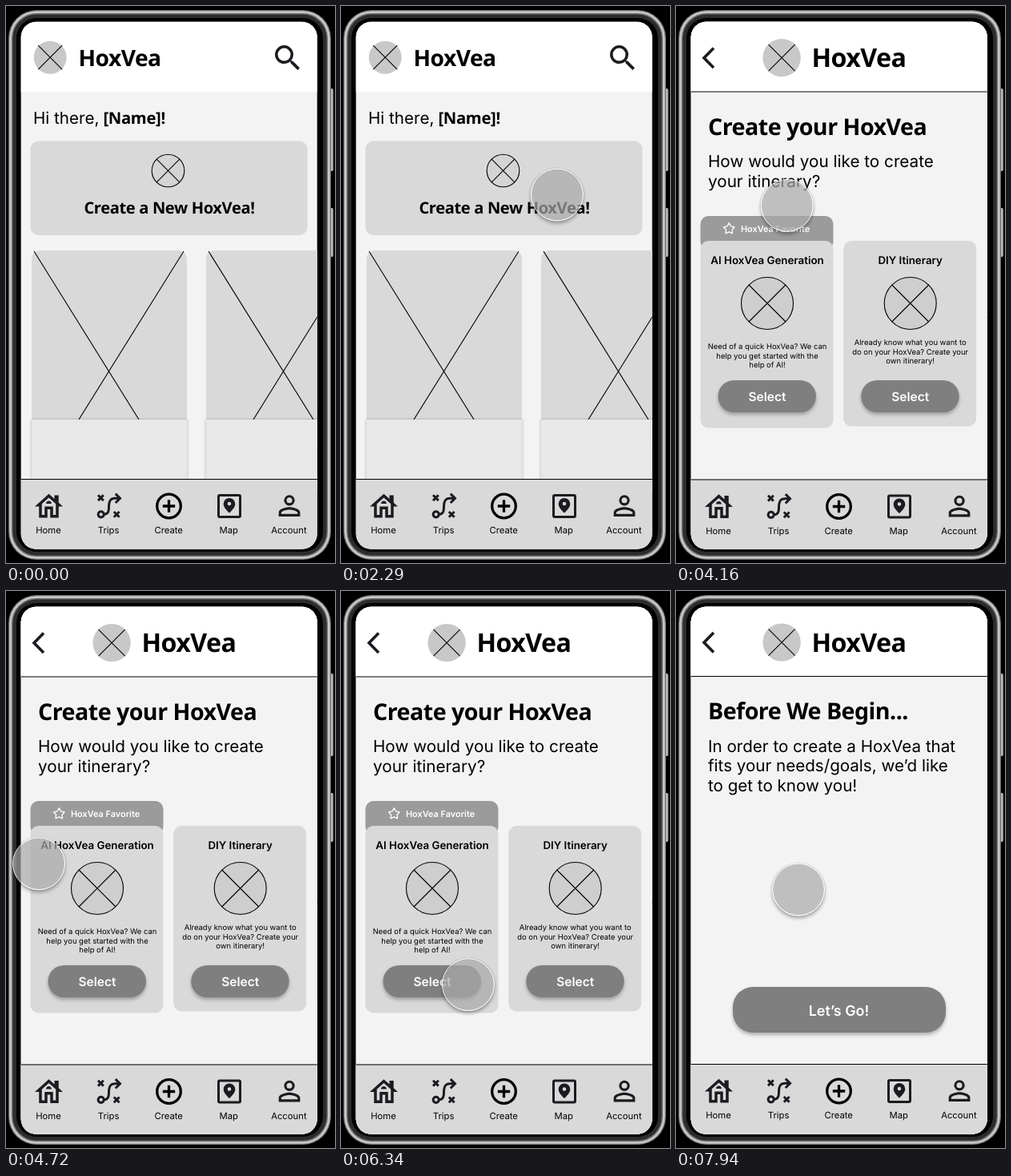
Recreate the animation shown at these times as an HTML page. Size 411 by 695 pixels, loop 8 s.

```html
<!DOCTYPE html>
<html lang="en">
<head>
<meta charset="utf-8">
<title>Trip planner prototype</title>
<style>
html, body { margin: 0; width: 100%; height: 100%; overflow: hidden; background: #000; }
svg { position: absolute; left: 0; top: 0; display: block; }
text { font-family: Inter, sans-serif; text-rendering: geometricPrecision; white-space: pre; }
.head { font-family: "Noto Sans", "Open Sans", sans-serif; font-weight: 700; letter-spacing: -.018em; }
.semi { font-weight: 600; }
.mid { text-anchor: middle; }
.thin { stroke: #000; stroke-width: 1.1; fill: none; }
.icon { fill: none; stroke: #1d1b20; }
.drop { filter: drop-shadow(0 3px 2px rgba(0, 0, 0, .27)); }
.glow { filter: drop-shadow(0 0 1.5px rgba(0, 0, 0, .3)); }
#touch {
  position: absolute; left: -33px; top: -33px; width: 66px; height: 66px;
  box-sizing: border-box; border-radius: 50%; border: 1.5px solid #fff;
  background: rgba(170, 170, 170, .7); background-clip: padding-box;
  box-shadow: 0 3px 4px rgba(0, 0, 0, .3), 0 0 1px rgba(0, 0, 0, .6);
}
</style>
</head>
<body>
<svg id="stage" width="411" height="695" viewBox="0 0 411 695"></svg>
<div id="touch"></div>
<script>
const BRAND = 'HoxVea';
const GREY = '#d9d9d9';
const INK = '#1d1b20';

const rect = (x, y, w, h, r, fill, cls = '') =>
  `<rect x="${x}" y="${y}" width="${w}" height="${h}" rx="${r}" fill="${fill}" class="${cls}"/>`;
const text = (x, y, size, str, cls = '', fill = '#000') =>
  `<text x="${x}" y="${y}" font-size="${size}" class="${cls}" fill="${fill}">${str}</text>`;
const lines = (x, y, size, step, list, cls) =>
  list.map((s, i) => text(x, y + i * step, size, s, cls)).join('');
const path = (d, attrs) => `<path d="${d}" ${attrs}/>`;
const glyph = (d, x, y, scale) =>
  path(d, `fill="${INK}" fill-rule="evenodd" transform="translate(${x} ${y}) scale(${scale})"`);
const cross = (x, y, d) =>
  path(`M${x - d} ${y - d}l${2 * d} ${2 * d}M${x + d} ${y - d}l${-2 * d} ${2 * d}`, 'class="thin"');
const badge = (x, y, r, d, fill, outline) =>
  `<circle cx="${x}" cy="${y}" r="${r}" fill="${fill}" ${outline ? 'stroke="#000" stroke-width="1.1"' : ''}/>` +
  cross(x, y, d);
const button = (x, y, w, h, r) => rect(x, y, w, h, r, '#7f7f7f', 'drop');

// Concentric bezel layers, from the outer rim to the black glass edge
const bezel = (inset, fill) =>
  rect(3 + inset, 5 + inset, 403 - 2 * inset, 686 - 2 * inset, 35 - inset, fill);
const phone = rect(400, 103, 9, 103, 2, 'url(#metal)') + rect(400, 252, 9, 61, 2, 'url(#metal)') +
  bezel(0, '#6a6a6a') + bezel(1.2, '#c6c6c6') + bezel(4, '#6e6e6e') + bezel(5.5, '#2c2c2c') + bezel(10, '#000');

function nav() {
  const home = 'M19 9.3V4h-3v2.6L12 3 2 12h3v8h6v-6h2v6h6v-8h3L19 9.3zM17 18h-2v-6H9v6H7v-7.81l5-4.5 5 4.5V18z' +
    'M10 10h4c0-1.1-.9-2-2-2s-2 .9-2 2z';
  const person = 'M12 5.9a2.1 2.1 0 1 1 0 4.2 2.1 2.1 0 0 1 0-4.2m0 9c2.97 0 6.1 1.46 6.1 2.1v1.1H5.9V17' +
    'c0-.64 3.13-2.1 6.1-2.1M12 4a4 4 0 1 0 0 8 4 4 0 0 0 0-8zm0 9c-2.67 0-8 1.34-8 4v3h16v-3c0-2.66-5.33-4-8-4z';
  const pin = 'M0 8.5c-5-4.6-7.3-8-7.3-11.3a7.3 7.3 0 0 1 14.6 0c0 3.3-2.3 6.7-7.3 11.3z' +
    'M0-5.3a2.3 2.3 0 1 0 0 4.6 2.3 2.3 0 0 0 0-4.6z';
  const labels = ['Home', 'Trips', 'Create', 'Map', 'Account'];
  return rect(18, 590, 372, 90, 0, GREY) +
    path('M18 590.5H390', 'class="thin"') +
    glyph(home, 32.5, 603.5, 1.75) + glyph(pin, 279, 624, 1) + glyph(person, 334, 603.5, 1.67) +
    `<g class="icon" stroke-width="3">
      <circle cx="118.7" cy="634.3" r="3.6"/>
      <path d="M122.3 634.3C128 634 128.5 630 128.5 625S129 614.3 136 614.3H142M136.8 608.6l5.7 5.7-5.7 5.7"/>
      <path d="M115 610.3l6.8 6.8m0-6.8l-6.8 6.8M134.8 631l6.8 6.8m0-6.8l-6.8 6.8"/>
      <rect x="265.5" y="610.5" width="27" height="27" rx="1.5"/>
    </g>
    <g class="icon" stroke-width="3.3" style="stroke:#000">
      <circle cx="203.5" cy="624" r="14.8"/><path d="M203.5 616.3v15.4M195.8 624h15.4"/>
    </g>` +
    labels.map((s, i) => text(53 + i * 75.1, 658, 11.3, s, 'mid')).join('');
}

const backdrop = rect(18, 18, 372, 664, 0, '#f3f3f3') + rect(18, 18, 372, 89, 0, '#fff');

function photoCard(x) {
  return rect(x, 305, 194, 240, 10, GREY) +
    path(`M${x + 3} 306L${x + 134} 516M${x + 190} 306L${x + 59} 516`, 'class="thin"') +
    rect(x - .5, 516, 195, 90, 0, '#e8e8e8', 'glow');
}

function homeScreen() {
  const lens = 'M15.5 14h-.79l-.28-.27A6.47 6.47 0 0 0 16 9.5 6.5 6.5 0 1 0 9.5 16c1.61 0 3.09-.59 4.23-1.57' +
    'l.27.28v.79l5 4.99L20.49 19l-4.99-5zm-6 0a4.5 4.5 0 1 1 0-9 4.5 4.5 0 0 1 0 9z';
  return backdrop +
    badge(55.2, 64.2, 20.5, 15, '#c8c8c8') +
    text(90.5, 75, 28.2, BRAND, 'head') +
    glyph(lens, 330.7, 43.7, 1.77) +
    text(34, 147, 20.6, 'Hi there, ') + text(121.5, 147, 20.3, '[Name]!', 'head') +
    rect(30.5, 168.5, 346, 117.5, 10, GREY) +
    badge(202.5, 205.5, 20.3, 14.3, '#d4d4d4', true) +
    text(204, 259, 20.1, `Create a New ${BRAND}!`, 'head mid') +
    photoCard(32) + photoCard(250) + nav();
}

const innerHeader = backdrop +
  path('M18 106.5H390', 'class="thin"') +
  path('M47 52L35 64.2 47 76.4', `fill="none" stroke="${INK}" stroke-width="3.6"`) +
  badge(132.1, 64.1, 23.7, 16.5, '#c8c8c8') +
  text(169.5, 75.5, 32.2, BRAND, 'head');

function choice(x, h, title, info, infoY) {
  const mid = x + 83.5;
  return rect(x, 292.5, 166, h, 10, GREY) +
    text(mid, 321.5, 13.35, title, 'semi mid') +
    badge(mid, 370.5, 32.5, 23, '#cecece', true) +
    lines(mid, infoY, 9.45, 11.5, info, 'mid') +
    button(x + 22, 466.5, 122.5, 40, 20) +
    text(mid, 492, 15.5, 'Select', 'semi mid', '#fff');
}

function star(x, y, r) {
  const pts = Array.from({ length: 10 }, (_, i) => {
    const a = i * Math.PI / 5 - Math.PI / 2, d = i % 2 ? r * .55 : r;
    return `${(x + d * Math.cos(a)).toFixed(2)},${(y + d * Math.sin(a)).toFixed(2)}`;
  });
  return `<polygon points="${pts.join(' ')}" fill="none" stroke="#fff" stroke-width="1.3" stroke-linejoin="round"/>`;
}

function createScreen() {
  return innerHeader +
    text(40, 160.5, 28.6, `Create your ${BRAND}`, 'head') +
    lines(40, 200.5, 20.7, 24.8, ['How would you like to create', 'your itinerary?']) +
    rect(30.5, 261.5, 166, 42, 10, '#9b9b9b') + star(66.3, 277.5, 7.2) +
    text(81, 281.5, 10.9, `${BRAND} Favorite`, 'semi', '#fff') +
    choice(30.5, 233.5, `AI ${BRAND} Generation`,
      [`Need of a quick ${BRAND}? We can`, 'help you get started with the', 'help of AI!'], 427.5) +
    choice(209.2, 231.5, 'DIY Itinerary',
      ['Already know what you want to', `do on your ${BRAND}? Create your`, 'own itinerary!'], 422.5) +
    nav();
}

function introScreen() {
  return innerHeader +
    text(40, 160, 28.6, 'Before We Begin...', 'head') +
    lines(40, 200.5, 20.6, 24.7,
      [`In order to create a ${BRAND} that`, 'fits your needs/goals, we’d like', 'to get to know you!']) +
    button(71, 494, 266, 57, 25) +
    text(203.5, 529.5, 17.9, 'Let’s Go!', 'semi mid', '#fff') +
    nav();
}

document.getElementById('stage').innerHTML = `<defs>
  <linearGradient id="metal"><stop offset=".4" stop-color="#555"/><stop offset=".75" stop-color="#ccc"/><stop offset="1" stop-color="#777"/></linearGradient>
  <clipPath id="glass"><rect x="18.7" y="19.7" width="370" height="658" rx="19"/></clipPath>
  </defs>${phone}<g clip-path="url(#glass)">
  ${homeScreen()}
  <g id="create"><g transform="translate(0 .5)">${createScreen()}</g></g>
  <g id="intro">${introScreen()}</g></g>`;

// Key points of the finger's path: time in ms, x, y. Equal neighbours are rests.
const keys = [
  [1040, 450, 440], [1240, 372, 415], [1660, 283, 309], [2290, 270, 235.5],
  [3280, 270, 235.5], [3820, 214, 297], [4160, 139, 249], [4400, 66, 259], [4720, 41, 340],
  [4930, 91, 366], [5400, 188, 323], [5760, 197, 415], [6340, 159, 491], [6660, 152, 492],
  [7660, 152, 492], [7940, 153, 373], [8000, 152, 341]
];
const rests = (a, b) => a && b && a[1] === b[1] && a[2] === b[2];

function slope(i, k) {
  if (rests(keys[i - 1], keys[i]) || rests(keys[i], keys[i + 1])) return 0;
  const a = keys[i - 1] || keys[i], b = keys[i + 1] || keys[i];
  return (b[k] - a[k]) / (b[0] - a[0]);
}

// Smooth Hermite curve through the key points
function touchAt(t) {
  let i = 0;
  while (i < keys.length - 2 && t >= keys[i + 1][0]) i++;
  const a = keys[i], b = keys[i + 1], d = b[0] - a[0];
  const u = Math.min(1, Math.max(0, (t - a[0]) / d)), v = 1 - u;
  return [1, 2].map(k =>
    a[k] * (1 + 2 * u) * v * v + b[k] * u * u * (3 - 2 * u) +
    d * u * v * (slope(i, k) * v - slope(i + 1, k) * u));
}

const [create, intro, touch] = ['create', 'intro', 'touch'].map(id => document.getElementById(id));
const fade = (t, show, start, end) => t < show ? 0 : Math.min(1, (t - start) / (end - start));

function draw(t) {
  create.setAttribute('opacity', fade(t, 2750, 2690, 2950));
  intro.setAttribute('opacity', fade(t, 7130, 7060, 7200));
  const [x, y] = touchAt(t);
  touch.style.visibility = t < 1105 ? 'hidden' : 'visible';
  touch.style.transform = `translate(${x.toFixed(2)}px, ${y.toFixed(2)}px)`;
}

const begin = performance.now();
function tick() {
  draw((performance.now() - begin) % 8000);
  requestAnimationFrame(tick);
}
tick();
</script>
</body>
</html>
```
